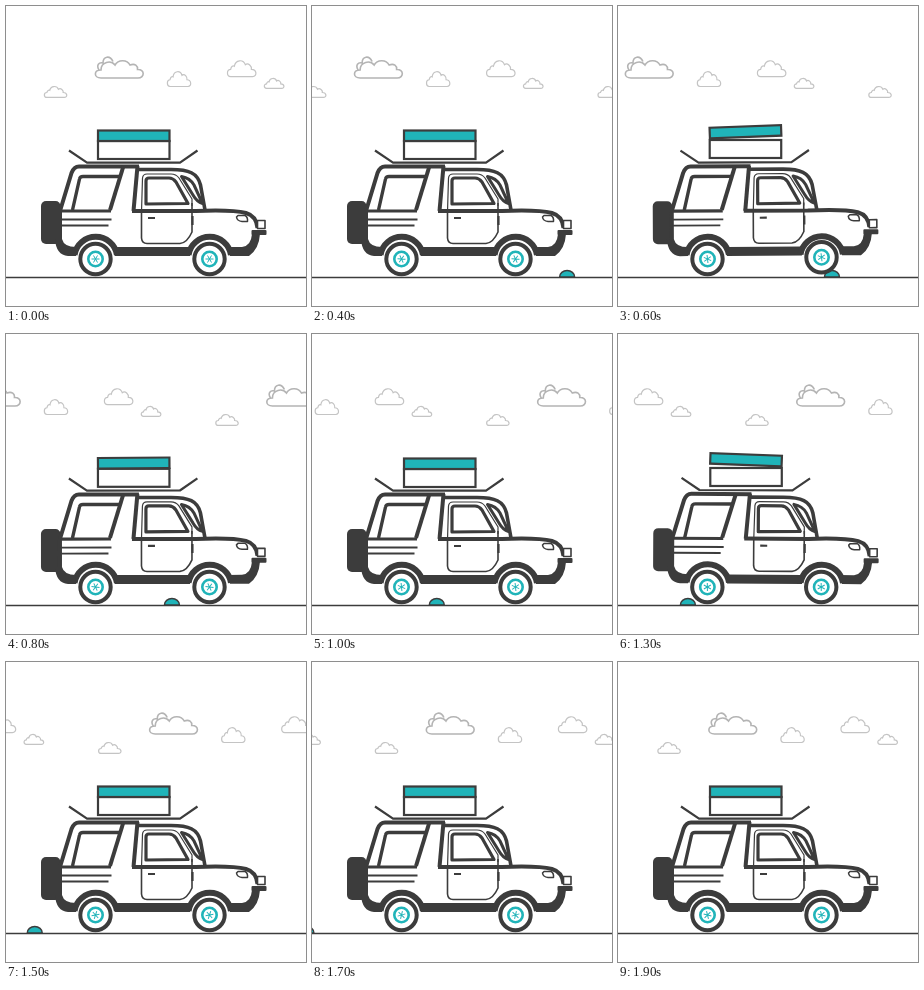
An HTML page for the animation above (2000 ms loop, 300 px wide and 300 px high).

```html
<!DOCTYPE html>
<html lang="en">
<head>
<meta charset="utf-8">
<title>Road trip</title>
<style>
  html, body { margin: 0; width: 100%; height: 100%; overflow: hidden; background: #fff; }
  svg { display: block; width: 100vw; height: 100vh; }
  .line { fill: none; stroke: #3c3c3c; stroke-linejoin: round; }
  .dark { fill: #3c3c3c; }
  .teal { fill: #20b4b9; }
  .white { fill: #fff; }
  .cloud { fill: none; stroke: #c4c4c4; stroke-width: 1.2; }
  .cloud.big { stroke: #b4b4b4; stroke-width: 1.6; }
</style>
</head>
<body>
<svg viewBox="0 0 300 300">
  <defs>
    <path id="puff" vector-effect="non-scaling-stroke" d="M6 21.200C-1 21 -1 12 6 12C7 8 10 7 12 8C14 -1 27 -1 30 6C35 3 41 8 40 12C49 12 50 21 42 21.200Z"/>
    <path id="bank" d="M6 21C-1.500 21 -1.500 13 6 13C6 4.500 16 3 20 8C23 2.500 32 2 35 8C40 6 43 9 42.500 12.500C50 12 50 21 43 21ZM4 13C1 8 4 5 8 6C8 -1 15 -2 18 4.500"/>
    <g id="tyre">
      <circle r="15.2" fill="#fff" stroke="#3c3c3c" stroke-width="4"/>
      <circle r="7.200" fill="none" stroke="#20b4b9" stroke-width="2.600"/>
    </g>
    <path id="star" d="M-4 0H4M-2 -3.500L2 3.500M2 -3.500L-2 3.500" stroke="#20b4b9"/>
  </defs>

  <g id="sky"></g>
  <path class="line" stroke-width="1.6" d="M0 271.5H300"/>
  <path id="rock" class="line" style="fill:#20b4b9" stroke-width="1.4" d="M-7.5 271A7.5 6.5 0 0 1 7.5 271Z"/>

  <g id="body">
    <path class="line" stroke-width="2.2" d="M63 144.5L81 156.6H174L191.5 144.5"/>
    <rect class="dark" x="35" y="195" width="19.5" height="43" rx="5"/>
    <g class="line">
      <path stroke-width="4" d="M54 238V205L65.500 167Q68 160.500 73 160.500H133"/>
      <path stroke-width="3.4" d="M66.500 204L73.500 173Q74 170.500 77 170.500H114"/>
      <path stroke-width="4" d="M117.500 160L104 204"/>
      <path stroke-width="4" d="M131.500 160L127.500 205"/>
      <path stroke-width="3.6" d="M131 163.500H165C183 163.500 191.500 167 194.500 179L199 204"/>
      <path stroke-width="3.2" d="M140 198V175Q140 172 143 172H163Q167 172 170 176L182 197.500Z"/>
      <path stroke-width="1.2" d="M135.500 206L136.500 172Q137 168 141 168H165Q170 168 173 172L186 193V200"/>
      <path stroke-width="3" d="M175.500 170.500Q184 172 188 179L196.500 197.500Q191 196 187 189Z"/>
      <path stroke-width="3.2" d="M54 205H105"/>
      <path stroke-width="1.8" d="M55 213.500H105.500M55 219.500H102.500"/>
      <path stroke-width="4" d="M126 205H190Q226 203.500 240 207Q250.500 210 251.500 222"/>
      <path stroke-width="1.6" d="M135.500 206V232Q136 237.500 141 237.500H174Q181 237 186 226V197"/>
      <path stroke-width="2.2" d="M142 212H149M186.500 210V219"/>
      <path stroke-width="1.5" d="M232 209.500H239Q242 211 241.500 215.500H236Q231 215 230.500 211Z"/>
      <path stroke-width="6" d="M68.500 249A21.500 21.500 0 0 1 111 249"/>
      <path stroke-width="9" d="M109 245.500H184"/>
      <path stroke-width="6" d="M182.500 249A21.500 21.500 0 0 1 225 249"/>
      <rect class="white" style="fill:#fff" stroke-width="1.6" x="251.500" y="214.500" width="7.500" height="8"/>
    </g>
    <g class="dark">
      <path d="M49 233H56Q58 241 70 241V250H62Q50 249 49 233Z"/>
      <path d="M222 241H236Q245 240 246 228H254Q253 243 243 250H224Z"/>
      <rect x="245.500" y="224" width="15" height="5" rx="1"/>
    </g>
  </g>

  <g class="line" stroke-width="2.2">
    <rect id="crate" class="white" x="92" y="135" width="71.5" height="18" stroke-linejoin="miter"/>
    <rect id="lid" class="teal" x="92" y="124.5" width="71.5" height="10.5" stroke-linejoin="miter"/>
  </g>
  <g id="rear"><use href="#tyre"/><use class="spin" href="#star"/></g>
  <g id="front"><use href="#tyre"/><use class="spin" href="#star"/></g>
</svg>
<script>
  const LOOP = 2000, STEP = 100, SKY = 294.5;
  const REAR = 89.5, FRONT = 203.5, AXLE = 253, RADIUS = 17;
  const CLOUD_SPEED = 5.86, ROAD_SPEED = 6.86;
  // distance advanced at each step; the first pose is held twice as long
  const ADVANCE = [0, 2, 3, 3, 3, 3, 3, 4, 3, 3, 2, 3, 3, 3, 3, 3, 2, 2, 2];
  let sum = 0;
  const travel = ADVANCE.map(d => sum += d);

  const $ = id => document.getElementById(id);
  const move = (el, value) => el.setAttribute('transform', value);
  const bump = (d, half) => Math.abs(d) < half ? Math.cos(d / half * Math.PI / 2) ** 2 : 0;

  // x, y, width scale, height scale; the first is the big one
  const clouds = [
    [89, 51, 1, 1], [161, 65, .5, .73], [221, 54, .61, .78],
    [258, 72, .42, .49], [38, 80, .48, .54]
  ].map(([x, y, sx, sy], i) => {
    const pair = [0, 1].map(() => {
      const g = document.createElementNS('http://www.w3.org/2000/svg', 'g');
      g.setAttribute('class', i ? 'cloud' : 'cloud big');
      g.innerHTML = `<use href="#${i ? 'puff' : 'bank'}"/>`;
      $('sky').append(g);
      return g;
    });
    return { x, y, sx, sy, pair };
  });
  const spokes = document.querySelectorAll('.spin');

  function pose(s) {
    const rock = 310 - ROAD_SPEED * s;
    const f = bump(s - 17, 4.7), r = bump(s - 32, 4.7);
    const hop = f + r, tilt = r - f;

    for (const c of clouds) {
      const x = (c.x - CLOUD_SPEED * s + 60 + SKY) % SKY - 60;
      c.pair.forEach((g, i) => move(g, `translate(${x + i * SKY} ${c.y}) scale(${c.sx} ${c.sy})`));
    }
    move($('rock'), `translate(${rock} 0)`);
    move($('body'), `rotate(${r} ${FRONT} ${AXLE}) rotate(${-f} ${REAR} ${AXLE})`);
    move($('crate'), `translate(${tilt} ${-3.5 * hop})`);
    move($('lid'), `translate(${tilt} ${-14 * hop}) rotate(${7.5 * tilt} 127.75 129.75)`);
    move($('rear'), `translate(${REAR - r * .5} ${AXLE - 6.5 * bump(rock - REAR, 16)})`);
    move($('front'), `translate(${FRONT - r} ${AXLE - 6.5 * bump(rock - FRONT, 16)})`);
    spokes.forEach(el => move(el, `rotate(${s * ROAD_SPEED / RADIUS * 180 / Math.PI})`));
  }

  const start = performance.now();
  function tick() {
    const t = (performance.now() - start) % LOOP;
    pose(travel[Math.max(0, Math.floor(t / STEP) - 1)]);
    requestAnimationFrame(tick);
  }
  tick();
</script>
</body>
</html>
```
